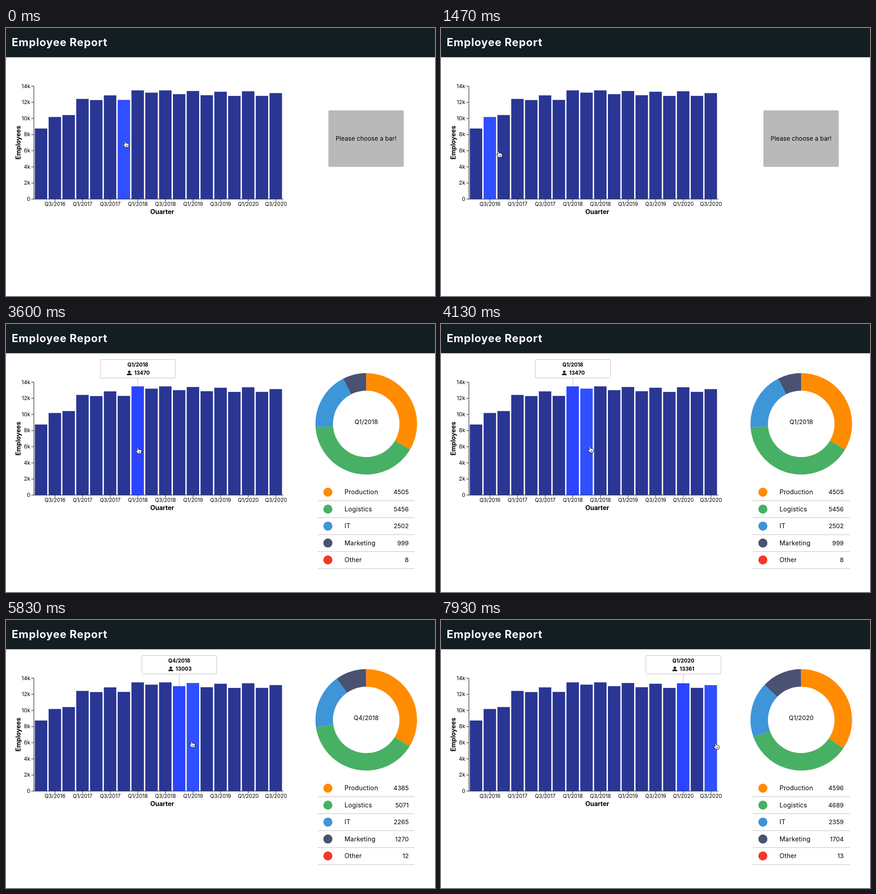
An HTML page for the animation above (8 s loop, 946x592 px).

```html
<!DOCTYPE html>
<html lang="en">
<head>
<meta charset="utf-8">
<title>Employee Report</title>
<style>
  html, body { margin: 0; width: 100%; height: 100%; overflow: hidden; background: #fff; }
  svg { display: block; width: 946px; height: 592px; font-family: Inter, "Open Sans", sans-serif; }
  text { font-size: 14px; letter-spacing: .015em; }
  .title { font-size: 24px; font-weight: 700; letter-spacing: .033em; fill: #fff; }
  .bold { font-weight: 700; letter-spacing: 0; }
  .mid { text-anchor: middle; letter-spacing: 0; }
  .end { text-anchor: end; letter-spacing: 0; }
  .small { font-size: 11.5px; }
  .medium { font-size: 13.6px; }
  .axis text { font-size: 12px; }
  .axis .small { font-size: 11.5px; }
  .axis path { stroke: #111; fill: none; }
</style>
</head>
<body>
<svg viewBox="0 0 946 592">
  <rect width="946" height="64.6" fill="#131d22"/>
  <text class="title" x="12.5" y="40">Employee Report</text>
  <g id="bars"></g>
  <g id="axis" class="axis"></g>
  <text class="bold mid" transform="translate(31.5 253) rotate(-90)">Employees</text>
  <text class="bold mid" x="344.5" y="411">Ouarter</text>

  <g id="card">
    <rect x="711" y="182" width="166" height="124.7" rx="3" fill="#b9b9b9"/>
    <text class="mid medium" x="794" y="249.3">Please choose a bar!</text>
  </g>

  <g id="tip">
    <path id="stem" stroke="#bbb" fill="none"/>
    <rect x="-82.7" y="78.5" width="165.5" height="41" rx="2" fill="#fff" stroke="#c4bebe"/>
    <text id="tipName" class="bold mid small" y="94"></text>
    <circle cx="-18.8" cy="105.6" r="2.7"/>
    <path d="M-24 113v-1.4c0-1.8 3.4-2.7 5.2-2.7s5.2.9 5.2 2.7v1.4z"/>
    <text id="tipTotal" class="bold small" x="-8" y="112.2"></text>
  </g>

  <g id="detail">
    <g id="ring"></g>
    <text id="ringName" class="mid medium" x="794.3" y="220.5"></text>
    <g id="legend"></g>
  </g>

  <g id="cursor" stroke-linejoin="round">
    <path id="hand" fill="#fff" stroke="#111"
      d="M-1.2 1.3Q0-1 1.3 1L2.2 4.8Q3.4 3.4 4.5 5 5.8 4 6.6 5.5 8.6 5 8.6 6.8V9.4Q8.6 11 7.5 13.7H1Q-1 11-3.4 7.8-3.6 5.4-1.5 6.6L-.2 7.6ZM3.1 8.8v2.8M5.2 8.8v2.8"/>
    <path id="arrow" stroke="#fff" d="M0-.5V12.3L2.9 9.7 5 14.6 7.2 13.6 5.1 8.9H9.2Z"/>
  </g>
</svg>
<script>
const LOOP = 8000;
const BASE = 377.8, LEFT = 63.5, STEP = 30.45, BAR = 27.5, THOUSAND = 17.82;
const RING = { x: 794.4, y: 220.6, outer: 112, inner: 73.4 };
const DARK = '#2a3693', HOVER = '#304ffe', CHOSEN = '#2a45ff';

// Employees per quarter, in thousands
const STAFF = [8.74, 10.17, 10.41, 12.41, 12.27, 12.85, 12.29, 13.47, 13.19,
               13.47, 13, 13.39, 12.87, 13.3, 12.78, 13.36, 12.79, 13.13];

const PARTS = { Production: '#ff8c00', Logistics: '#48b064', IT: '#3e95d8',
                Marketing: '#495272', Other: '#f2392d' };

const CLICKS = [
  { at: 2800, bar: 7, data: [4505, 5456, 2502, 999, 8], fade: 1 },
  { at: 5100, bar: 10, data: [4385, 5071, 2265, 1270, 12], fade: 300 },
  { at: 7000, bar: 15, data: [4596, 4689, 2359, 1704, 13], fade: 630 }
];

// Pointer: resting place, then eased moves
const REST = { x: 262, y: 250 };
const MOVES = [
  { from: 370, to: 570, x: 257, y: 250 },
  { from: 800, to: 1375, x: 102, y: 272 },
  { from: 1375, to: 1720, x: 230, y: 272 },
  { from: 1720, to: 2300, x: 275.6, y: 272 },
  { from: 2300, to: 2470, x: 290, y: 272.8 },
  { from: 3600, to: 4830, x: 385, y: 267 },
  { from: 5700, to: 6230, x: 537, y: 272 },
  { from: 7800, to: 7930, x: 605, y: 272 }
];

const $ = id => document.getElementById(id);
const lerp = (a, b, k) => a + (b - a) * k;
const sum = list => list.reduce((a, b) => a + b, 0);
const barLeft = i => LEFT + STEP * i;
const barMid = i => barLeft(i) + BAR / 2 + .3;
const barTop = i => BASE - STAFF[i] * THOUSAND;
const quarter = i => `Q${(i + 1) % 4 + 1}/${2016 + Math.floor((i + 1) / 4)}`;

// Smooth progress through a span of time, clamped to 0..1
function ease(t, from, to) {
  const k = Math.min(1, Math.max(0, (t - from) / (to - from)));
  return k * k * (3 - 2 * k);
}

function add(parent, tag, attrs, text = '') {
  const el = document.createElementNS('http://www.w3.org/2000/svg', tag);
  for (const key in attrs) el.setAttribute(key, attrs[key]);
  el.textContent = text;
  return $(parent).appendChild(el);
}

const bars = STAFF.map((n, i) =>
  add('bars', 'rect', { x: barLeft(i), y: barTop(i), width: BAR, height: n * THOUSAND }));

add('axis', 'path', { d: 'M56 128.5H61.5V378H611.5' });
for (let k = 0; k <= 14; k += 2) {
  const y = 378 - k * THOUSAND;
  add('axis', 'path', { d: `M56 ${y}h5.5` });
  add('axis', 'text', { class: 'end', x: 53.5, y: y + 4 }, k ? k + 'k' : '0');
}
for (let i = 1; i < STAFF.length; i += 2) {
  add('axis', 'path', { d: `M${barMid(i)} 378v5` });
  add('axis', 'text', { class: 'mid small', x: barMid(i), y: 393.3 }, quarter(i));
}

const slices = Object.values(PARTS).map(fill => add('ring', 'path', { fill }));
const counts = Object.entries(PARTS).map(([name, fill], i) => {
  const y = 371.5 + 37.45 * i;
  add('legend', 'circle', { cx: 709.8, cy: y, r: 10, fill });
  add('legend', 'text', { x: 746.5, y: y + 4.7 }, name);
  add('legend', 'path', { d: `M687 ${y + 18.9}h214`, stroke: '#bcbcbc' });
  return add('legend', 'text', { class: 'end medium', x: 888, y: y + 4.7 });
});

function pointer(t) {
  return MOVES.reduce((p, m) => {
    const k = ease(t, m.from, m.to);
    return { x: lerp(p.x, m.x, k), y: lerp(p.y, m.y, k) };
  }, REST);
}

function barAt(x) {
  const i = Math.floor((x - LEFT) / STEP);
  return x - barLeft(i) <= BAR ? i : -1;
}

function sector(from, to) {
  const { x, y, outer, inner } = RING;
  const at = (r, turn) => {
    const a = turn * 2 * Math.PI;
    return `${x + r * Math.sin(a)} ${y - r * Math.cos(a)}`;
  };
  const big = to - from > .5 ? 1 : 0;
  return `M${at(outer, from)}A${outer} ${outer} 0 ${big} 1 ${at(outer, to)}` +
         `L${at(inner, to)}A${inner} ${inner} 0 ${big} 0 ${at(inner, from)}Z`;
}

function drawRing(shares) {
  let from = 0;
  shares.forEach((share, i) => {
    slices[i].setAttribute('d', sector(from, from + share));
    from += share;
  });
}

const sharesOf = ({ data }) => data.map(v => v / sum(data));

function drawChoice(t, n) {
  const { at, bar, data, fade } = CLICKS[n];
  $('tip').setAttribute('transform', `translate(${barMid(bar)} 0)`);
  $('stem').setAttribute('d', `M0 119V${barTop(bar)}`);
  $('tipName').textContent = $('ringName').textContent = quarter(bar);
  $('tipTotal').textContent = sum(data);
  data.forEach((v, i) => counts[i].textContent = v);

  const old = sharesOf(CLICKS[Math.max(0, n - 1)]);
  const k = ease(t, at, at + fade);
  drawRing(sharesOf(CLICKS[n]).map((v, i) => lerp(old[i], v, k)));
}

const show = (id, on) => $(id).style.display = on ? '' : 'none';

function draw(t) {
  const n = CLICKS.filter(c => c.at <= t).length - 1;
  const chosen = n < 0 ? -1 : CLICKS[n].bar;
  show('card', n < 0);
  show('tip', n >= 0);
  show('detail', n >= 0);
  if (n >= 0) drawChoice(t, n);

  // Hover follows the pointer with a slight delay
  const hover = barAt(pointer(t - 30).x);
  bars.forEach((bar, i) =>
    bar.setAttribute('fill', i === chosen ? CHOSEN : i === hover ? HOVER : DARK));
  const { x, y } = pointer(t);
  $('cursor').setAttribute('transform', `translate(${x} ${y})`);
  show('hand', hover >= 0);
  show('arrow', hover < 0);
}

const start = performance.now();
function tick() {
  draw((performance.now() - start) % LOOP);
  requestAnimationFrame(tick);
}
tick();
</script>
</body>
</html>
```
